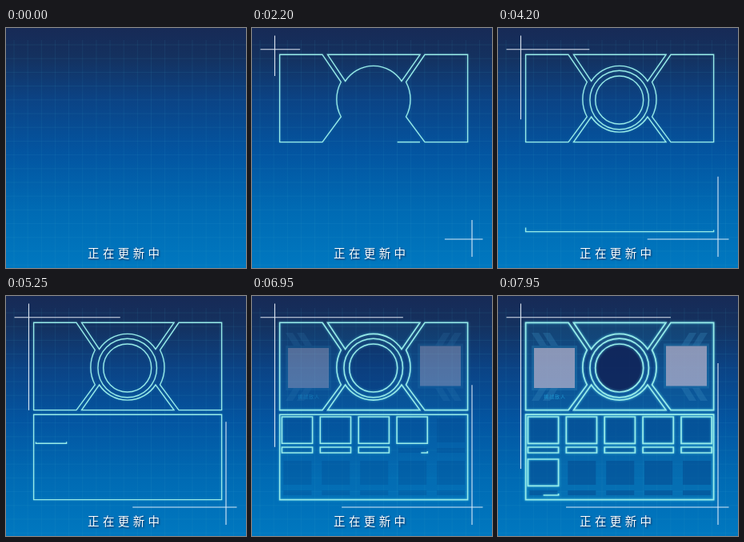
An HTML page for the animation above (8 s loop, 300 px wide and 300 px high).

```html
<!DOCTYPE html>
<html lang="zh">
<head>
<meta charset="utf-8">
<style>
  html, body { margin: 0; width: 100%; height: 100%; overflow: hidden; background: #0355a0; }
  svg { display: block; width: 100vw; height: 100vh; }
  text { font-family: "Noto Sans CJK SC", "Noto Sans CJK", sans-serif; }
  #caption { font-size: 14.5px; letter-spacing: 4.4px; fill: #fff; filter: drop-shadow(1px 1px 1px #012a55); }
</style>
</head>
<body>
<svg viewBox="0 0 300 300">
  <defs>
    <linearGradient id="sky" x2="0" y2="1">
      <stop offset="0" stop-color="#172a56"/>
      <stop offset=".12" stop-color="#14315f"/>
      <stop offset=".3" stop-color="#0b4385"/>
      <stop offset=".52" stop-color="#0355a1"/>
      <stop offset=".75" stop-color="#006ab3"/>
      <stop offset="1" stop-color="#0078c0"/>
    </linearGradient>
    <linearGradient id="photo" x2="0" y2="1">
      <stop offset="0" stop-color="#a3a8c4"/>
      <stop offset="1" stop-color="#a0a9c8"/>
    </linearGradient>
  </defs>
  <rect width="300" height="300" fill="url(#sky)"/>
  <path id="grid" stroke="#4bb4c8" stroke-opacity=".1" fill="none"/>
  <g id="fills"></g>
  <circle id="lens" cx="151.7" cy="90" r="30" fill="#10265a"/>
  <g id="outlines" fill="none" stroke="#98ebe8"></g>
  <path id="rulers" fill="none" stroke="#f2f8ff" stroke-opacity=".9" stroke-width="1.1"/>
  <text id="caption" x="102" y="287.3">正在更新中</text>
</svg>
<script>
const LOOP = 8000, STEP = 50;
const $ = id => document.getElementById(id);
const clamp = v => Math.max(0, Math.min(1, v));

function add(parent, tag, attrs) {
  const el = document.createElementNS('http://www.w3.org/2000/svg', tag);
  for (const key in attrs) el.setAttribute(key, attrs[key]);
  parent.appendChild(el);
  return el;
}

let grid = '';
for (let p = 10; p < 300; p += 17.15) grid += `M${p} 15V300`;
for (let p = 21; p < 300; p += 17.2) grid += `M0 ${p}H300`;
$('grid').setAttribute('d', grid);

// Outlines run clockwise; boxes start low on their right side.
const box = (x, y, w, h) =>
  `M${x + w} ${y + h - 2}v2h${-w}v${-h}h${w}Z`;
const ring = r => `M${151.7 + r} 90a${r} ${r} 0 1 1 ${-2 * r} 0a${r} ${r} 0 1 1 ${2 * r} 0`;
const cardX = i => 37.4 + 47.9 * i;

const panels = [
  'M88 33.3L111.3 67.5A45.8 45.8 0 0 0 111.3 111L88 142.6H34.6V33.3Z',
  'M210 33.3L187 66.5A42 42 0 0 0 116.6 66.5L94.5 33.3Z',
  'M216 33.3H269.6V142.6H216L192.5 111A45.8 45.8 0 0 0 192.5 67.5Z',
  'M210 142.6H94.5L116.6 111A42 42 0 0 0 187 111Z'
];
const tray = box(34.6, 148.2, 235, 106.4);
const outlines = [...panels, ring(36.8), ring(30), tray];
for (let i = 0; i < 6; i++) {
  const x = cardX(i % 5), dy = i < 5 ? 0 : 53;
  outlines.push(box(x, 151 + dy, 38.2, 33.3), box(x, 189 + dy, 38.2, 7));
}

const strokes = outlines.map(d => {
  const el = add($('outlines'), 'path', { d });
  return { el, length: el.getTotalLength() };
});
let total = 0;
for (const s of strokes) {
  s.start = total;
  total += s.length;
}

// Pen position: time, outline index, distance along that outline.
const penKeys = [
  [0, 0, 0], [1200, 1, 200], [3200, 4, 202], [5250, 7, 42],
  [6400, 11, 121], [6950, 14, 10], [7950, 18, 21]
].map(([time, index, along]) => [time, strokes[index].start + along]);

function penAt(t) {
  let i = 1;
  while (i < penKeys.length - 1 && t > penKeys[i][0]) i++;
  const [t0, a] = penKeys[i - 1], [t1, b] = penKeys[i];
  return a + (b - a) * (t - t0) / (t1 - t0);
}

// Interior fills, all fading in together.
const fills = $('fills');
for (const d of [...panels, tray]) add(fills, 'path', { d, fill: '#1a78ac', 'fill-opacity': .3 });
for (const [x, y, dir] of [[42, 46, 1], [262, 46, -1], [42, 131, 1], [262, 131, -1]]) {
  const v = y < 90 ? 1 : -1;
  for (const k of [0, 14]) {
    add(fills, 'path', {
      d: `M${x + dir * k} ${y}h${dir * 9}l${dir * 10} ${v * 16}h${-dir * 9}Z`,
      fill: '#3b8fc4', 'fill-opacity': .35
    });
  }
}
for (const [x, y] of [[45, 65], [210, 62.5]]) {
  add(fills, 'rect', { x: x - 3, y: y - 3, width: 57, height: 56, fill: '#2b86b8', 'fill-opacity': .4 });
  add(fills, 'rect', { x, y, width: 51, height: 50, fill: 'url(#photo)' });
}
for (let i = 0; i < 10; i++) {
  const x = cardX(i % 5) + 2, dy = i < 5 ? 0 : 53;
  add(fills, 'rect', { x, y: 153 + dy, width: 35, height: 30, fill: '#044a8e', 'fill-opacity': .6 });
  add(fills, 'rect', { x, y: 190 + dy, width: 35, height: 6, fill: '#044a8e', 'fill-opacity': .6 });
}
add(fills, 'text', { x: 57.5, y: 127.5, 'font-size': 6, 'letter-spacing': .8, fill: '#22a5dc' })
  .textContent = '挑战敌人';

function rulers(t) {
  const grow = .0271 * t, near = .5 + grow, left = 300.5 - grow, top = 299.5 - grow;
  let d = '';
  if (near > 10) d += `M10.5 26.7H${near}M28.5 9.5V${near}`;
  if (left < 288.5) d += `M288.5 264H${left}`;
  if (top < 286) d += `M275 286V${top}`;
  return d;
}

function draw(t) {
  const pen = penAt(t);
  for (const { el, start, length } of strokes) {
    const shown = Math.max(0, Math.min(length, pen - start));
    el.style.display = shown > 0 ? '' : 'none';
    el.setAttribute('stroke-dasharray', shown < length ? `${shown} ${length + 9}` : 'none');
  }
  const fade = clamp((t - 5700) / 2700);
  fills.setAttribute('opacity', fade);
  $('lens').setAttribute('opacity', clamp((t - 6750) / 1350));
  $('outlines').setAttribute('stroke-width', 1.4 + .4 * fade);
  $('outlines').style.filter = `drop-shadow(0 0 1.5px rgba(90,225,245,${.25 + .65 * fade}))`;
  $('rulers').setAttribute('d', rulers(t));
}

const began = performance.now();
function tick() {
  const t = (performance.now() - began) % LOOP;
  draw(Math.floor(t / STEP) * STEP);
  requestAnimationFrame(tick);
}
tick();
</script>
</body>
</html>
```
